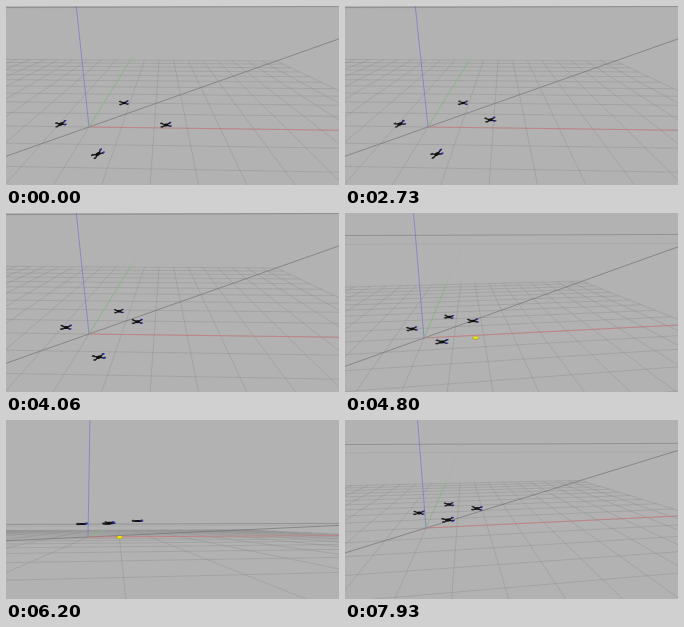
Write an HTML page that moves like this. It is 333 by 179 pixels and loops after 8 s.

```html
<!DOCTYPE html>
<html lang="en">
<head>
<meta charset="utf-8">
<title>Drone formation</title>
<style>
html, body { margin: 0; width: 100%; height: 100%; overflow: hidden; background: #b2b2b2; }
svg { display: block; width: 100vw; height: 100vh; }
path { fill: none; stroke-width: .7; }
</style>
</head>
<body>
<svg id="stage" viewBox="0 0 333 179" preserveAspectRatio="none">
  <rect width="100%" height="100%" fill="#b2b2b2"/>
  <path id="haze" stroke="#989898" opacity=".5"/>
  <path id="horizon" stroke="#858585"/>
  <path id="grid" stroke="#8c8c8c" style="stroke-width:.5" opacity=".8"/>
  <path id="diagonal" stroke="#747474"/>
  <path id="farGreen" stroke="#92bd92" opacity=".6"/>
  <path id="green" stroke="#80c280"/>
  <path id="red" stroke="#cc7777"/>
  <path id="blue" stroke="#7777cb"/>
  <g id="ball">
    <ellipse rx="3.2" ry="1.7" fill="#a59a18"/>
    <ellipse cy="-.3" rx="2.7" ry="1.2" fill="#f0e414"/>
  </g>
  <g id="drones"></g>
</svg>
<script>
const LOOP = 8000;
const NS = "http://www.w3.org/2000/svg";
const $ = id => document.getElementById(id);
const num = v => v.toFixed(2);
const clamp = v => Math.min(1, Math.max(0, v));

// Time, origin x and y, x axis scale and weight, y vanishing point, y axis weight
const views = [
  [4330, 83, 121, 32.1, -.0035, 157, 1, .126],
  [4800, 79, 125, 31.9, .0152, 122, 22, .108],
  [6200, 82, 117, 32.9, .0137, 112, 104, .11],
  [7060, 79, 111, 30, .0204, 120, 51, .105],
  [7800, 81, 108, 33, .0179, 118, 24, .113]
];

// Time, then x and y of the back, left, right and front drone
const flight = [
  [1750, 118, 97, 55, 118, 160, 119, 92, 148],
  [3460, 118, 97, 55, 118, 134.5, 110, 92, 148],
  [4400, 110, 99, 63, 112.6, 129.5, 108, 93.5, 142],
  [4800, 104, 104, 67, 116, 128, 108, 97, 129],
  [6200, 103.5, 102.6, 76, 104, 131.5, 101, 103, 103.5],
  [7060, 101, 91, 73, 97.5, 130, 93, 102, 101],
  [7800, 104, 84.5, 74, 93, 132, 88.5, 103, 100]
];

const looks = [
  { size: 4.7, tilt: -4 },
  { size: 5.5, tilt: -18 },
  { size: 5.4, tilt: -4 },
  { size: 6.2, tilt: -30 }
];

function sample(keys, t, ease = u => u) {
  const i = keys.findIndex(k => k[0] > t);
  if (i === 0) return keys[0];
  if (i < 0) return keys[keys.length - 1];
  const a = keys[i - 1], b = keys[i];
  const part = (t - a[0]) / (b[0] - a[0]);
  const u = i === keys.length - 1 ? ease(part) : part;
  return a.map((v, j) => v + (b[j] - v) * u);
}

function set(el, attrs) {
  for (const k in attrs) el.setAttribute(k, attrs[k]);
}

function make(tag, attrs, parent) {
  const el = document.createElementNS(NS, tag);
  set(el, attrs);
  return parent.appendChild(el);
}

const drones = looks.map(look => {
  const g = make("g", {}, $("drones"));
  const arms = make("path", { stroke: "#191919", style: "stroke-width:1.3" }, g);
  const rotors = ["#2b2b98", "#2a2a2e", "#2a2a2e", "#2b2b98"].map(fill => make("ellipse", { fill }, g));
  const body = make("ellipse", { fill: "#101010" }, g);
  return { ...look, g, arms, rotors, body };
});

function drawDrone({ g, arms, rotors, body, size, tilt }, i, x, y, t, squash) {
  const yaw = .12 * Math.sin(t / 330 + i * 1.7);
  const lean = tilt * (1 - .85 * clamp((t - 2600) / 1700));
  let d = "";
  set(g, { transform: `translate(${num(x)} ${num(y)}) rotate(${num(lean)})` });
  rotors.forEach((r, k) => {
    const a = yaw + Math.PI * (.2 + k * .5 + (k % 2 ? .1 : 0));
    const px = size * Math.cos(a), py = size * squash * Math.sin(a);
    d += `M0 0L${num(px)} ${num(py)}`;
    set(r, { cx: num(px), cy: num(py - .3), rx: num(size * .27), ry: num(Math.max(.65, size * .26 * squash)) });
  });
  set(arms, { d });
  set(body, { rx: num(size * .46), ry: num(size * (.16 + .2 * squash)) });
}

function drawScene([, ox, oy, ax, aw, vx, vy, bw]) {
  const weight = (x, y) => 1 + x * aw + y * bw;
  const point = (x, y) => {
    const w = weight(x, y);
    return num((ox + x * ax + y * bw * vx) / w) + " " + num((oy + (x * aw + y * bw) * vy) / w);
  };
  // Cut the near end of a ground line where it passes behind the camera
  const line = (x0, y0, x1, y1) => {
    const near = .08, w0 = weight(x0, y0), w1 = weight(x1, y1);
    if (w0 < near && w1 < near) return "";
    if (w0 < near) {
      const u = (near - w0) / (w1 - w0);
      x0 += (x1 - x0) * u;
      y0 += (y1 - y0) * u;
    }
    return `M${point(x0, y0)}L${point(x1, y1)}`;
  };
  const across = y => `M0 ${num(y + .5)}L333 ${num(y - .6)}`;
  let grid = "";
  for (let i = -10; i <= 10; i++) grid += line(i, -10, i, 10) + line(-10, i, 10, i);

  // Upright lines meet at a point far below the stage centre
  const nadir = 89.5 + 270 ** 2 / (89.51 - vy);
  const top = ox - (166.5 - ox) * oy / (nadir - oy);
  const paths = {
    grid,
    horizon: across(vy),
    haze: across(vy + Math.min(vy * .4, 200 / vy)),
    diagonal: line(-10, -10, 900, 900),
    farGreen: line(0, 10, 0, 900),
    green: line(0, 0, 0, 10),
    red: line(0, 0, 10, 0),
    blue: `M${num(ox)} ${num(oy)}L${num(top)} 0`
  };
  for (const id in paths) set($(id), { d: paths[id] });
}

function drawBall(t) {
  set($("ball"), {
    visibility: t >= 4400 && t < 7700 ? "visible" : "hidden",
    transform: t < 5300 ? "translate(130.7 125)" : "translate(113.7 117.5)"
  });
}

function render(t) {
  const view = sample(views, t, u => u * (2 - u));
  const spots = sample(flight, t);
  const squash = .12 + (104 - view[6]) * .0042;
  drawScene(view);
  drawBall(t);
  drones.forEach((d, i) => drawDrone(d, i, spots[2 * i + 1], spots[2 * i + 2], t, squash));
}

const start = performance.now();
function tick() {
  render((performance.now() - start) % LOOP);
  requestAnimationFrame(tick);
}
tick();
</script>
</body>
</html>
```
